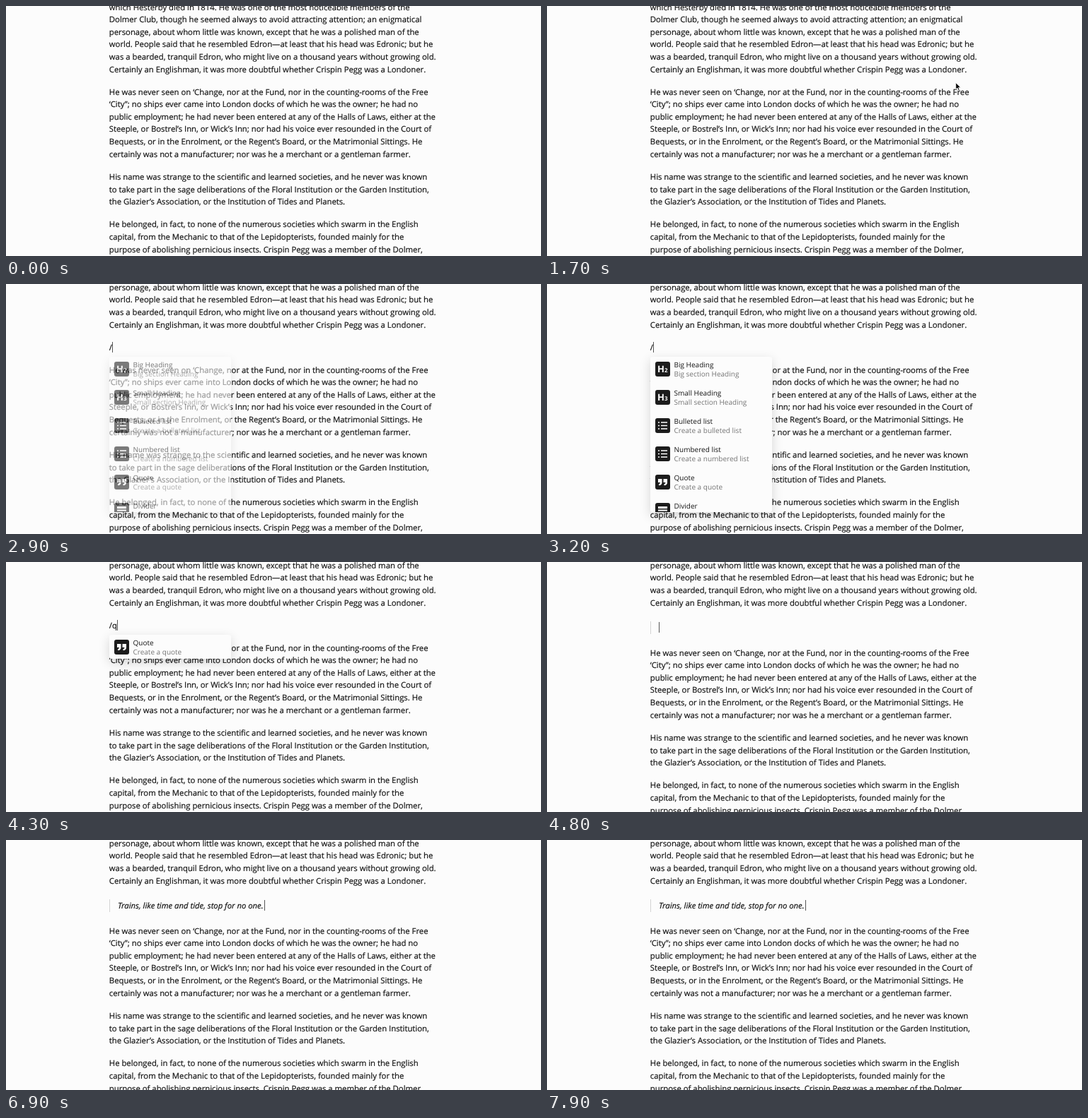
Write an HTML page that moves like this. It is 756 by 354 pixels and loops after 8 s.

```html
<!DOCTYPE html>
<html lang="en">
<head>
<meta charset="utf-8">
<title>Slash command editor</title>
<style>
  html, body { margin: 0; width: 100%; height: 100%; overflow: hidden; background: #fcfcfc; }
  #stage { position: relative; width: 756px; height: 354px; overflow: hidden;
    font: 11.32px/17.6px "Open Sans", sans-serif; color: #161616; text-rendering: geometricPrecision; }
  #stage div, #stage svg { position: absolute; white-space: pre; }
  .line, #quote { -webkit-text-stroke: .2px; }
  .line { left: 145.8px; }
  #hint { top: 81.6px; color: #b4b4b4; }
  #typed { top: 81.6px; }
  #plus { left: 122px; top: 81px; }
  #bar { left: 146px; top: 84px; width: 1px; height: 18px; background: #d4d4d4; }
  #quote { left: 158px; top: 85px; font-style: italic; }
  #caret { width: 1px; height: 15px; background: #555; }
  #menu { left: 146px; top: 103px; width: 172px; overflow: hidden; border-radius: 3px;
    background: #fcfcfc; box-shadow: 0 5px 16px rgba(0, 0, 0, .16); font-size: 10px; line-height: 13px; }
  .item { left: 0; width: 172px; height: 40px; }
  .item svg { left: 7px; top: 7px; }
  .item div { left: 33.5px; }
  .name { top: 5px; }
  .note { top: 18px; color: #757575; }
</style>
</head>
<body>
<div id="stage">
  <div id="above"></div>
  <div id="below"></div>
  <div id="hint" class="line">Type '/' for commands</div>
  <div id="typed" class="line"></div>
  <svg id="plus" width="18" height="18" fill="none" stroke="#777">
    <circle cx="9" cy="9" r="7.8"/><path d="M5.5 9h7M9 5.5v7"/>
  </svg>
  <div id="bar"></div>
  <div id="quote">Trains, like time and tide, stop for no one.</div>
  <div id="menu"></div>
  <div id="caret"></div>
  <svg id="mouse" width="10" height="14">
    <path d="M.7.7v9.3l2.2-2 1.5 3.4 1.6-.7-1.5-3.3h3z" fill="#000" stroke="#fff" stroke-width=".7"/>
  </svg>
</div>
<script>
const LOOP = 8000, STEP = 100, LEAD = 17.6, GAP = 32.3;
const $ = id => document.getElementById(id);

const intro = [
  "which Hesterby died in 1814. He was one of the most noticeable members of the",
  "Dolmer Club, though he seemed always to avoid attracting attention; an enigmatical",
  "personage, about whom little was known, except that he was a polished man of the",
  "world. People said that he resembled Edron—at least that his head was Edronic; but he",
  "was a bearded, tranquil Edron, who might live on a thousand years without growing old.",
  "Certainly an Englishman, it was more doubtful whether Crispin Pegg was a Londoner."
];
const rest = [[
  "He was never seen on ‘Change, nor at the Fund, nor in the counting-rooms of the Free",
  "‘City”; no ships ever came into London docks of which he was the owner; he had no",
  "public employment; he had never been entered at any of the Halls of Laws, either at the",
  "Steeple, or Bostrel’s Inn, or Wick’s Inn; nor had his voice ever resounded in the Court of",
  "Bequests, or in the Enrolment, or the Regent’s Board, or the Matrimonial Sittings. He",
  "certainly was not a manufacturer; nor was he a merchant or a gentleman farmer."
], [
  "His name was strange to the scientific and learned societies, and he never was known",
  "to take part in the sage deliberations of the Floral Institution or the Garden Institution,",
  "the Glazier’s Association, or the Institution of Tides and Planets."
], [
  "He belonged, in fact, to none of the numerous societies which swarm in the English",
  "capital, from the Mechanic to that of the Lepidopterists, founded mainly for the",
  "purpose of abolishing pernicious insects. Crispin Pegg was a member of the Dolmer,"
]];

function addLines(box, lines, top) {
  lines.forEach((text, i) => {
    const el = document.createElement("div");
    el.className = "line";
    el.textContent = text;
    el.style.top = top + i * LEAD + "px";
    box.append(el);
  });
  return top + (lines.length - 1) * LEAD + GAP;
}
addLines($("above"), intro, -6.45);
rest.reduce((top, lines) => addLines($("below"), lines, top), 113.65);

const heading = n => `<text x="3" y="15" font-size="13" font-weight="700">H</text>
  <text x="13" y="15" font-size="8" font-weight="700">${n}</text>`;
const list = [6, 10.5, 15].map(y => `<path d="M4 ${y}h2M8 ${y}h9" stroke="#fff" stroke-width="1.7"/>`).join("");
const mark = x => `<path d="M${x} 6h5.5v5q0 4-4.5 4.3v-2q2-.4 2-2.3h-3z"/>`;
const items = [
  ["Big Heading", "Big section Heading", heading(2)],
  ["Small Heading", "Small section Heading", heading(3)],
  ["Bulleted list", "Create a bulleted list", list],
  ["Numbered list", "Create a numbered list", list],
  ["Quote", "Create a quote", mark(4) + mark(11.5)],
  ["Divider", "Insert a divider", '<path d="M4 5h13v3H4zM4 9.5h13v2H4zM4 13h13v3H4z"/>']
];
$("menu").innerHTML = items.map(([name, note, icon]) => `<div class="item">
  <svg width="21" height="21" fill="#fff"><rect width="21" height="21" rx="3" fill="#1c1c1c"/>${icon}</svg>
  <div class="name">${name}</div><div class="note">${note}</div></div>`).join("");
const rows = [...document.querySelectorAll(".item")];

// start, end, x, y
const carets = [
  [1200, 1700, 592, 82], [1800, 2300, 146, 82], [2800, 3300, 150, 82],
  [3300, 3800, 157, 82], [4300, 4800, 157, 82], [4800, 5300, 158, 85],
  [5800, 5900, 158, 85], [5900, 6400, 365, 85], [6900, 7400, 365, 85], [7900, 8000, 365, 85]
];

const show = (id, on) => { $(id).style.visibility = on ? "visible" : "hidden"; };
const move = (id, x, y) => { $(id).style.transform = `translate(${x}px, ${y}px)`; };
const bezier = (a, b, c, d, s) => {
  const r = 1 - s;
  return r * r * r * a + 3 * r * r * s * b + 3 * r * s * s * c + s * s * s * d;
};

function draw(t) {
  const within = (a, b) => t >= a && t < b;
  const entered = t >= 1800, quoted = t >= 4800, filtered = t >= 3300;

  move("above", 0, entered ? -GAP : 0);
  move("below", 0, quoted ? 7.3 : 0);

  show("mouse", within(100, 1800));
  const p = Math.min(1, Math.max(0, (t - 100) / 600)), s = 1 - (1 - p) ** 2;
  move("mouse", bezier(148, 300, 640, 577, s), bezier(322, 60, -50, 108, s));

  show("hint", within(1800, 2800));
  show("plus", within(1800, 2800));
  show("typed", within(2800, 4800));
  $("typed").textContent = filtered ? "/q" : "/";

  show("menu", within(2800, 4800));
  $("menu").style.opacity = 1 - (1 - Math.min(1, Math.max(0, (t - 2800) / 400))) ** 3;
  $("menu").style.height = filtered ? "34px" : "220px";
  rows.forEach((row, i) => {
    row.style.display = filtered && i !== 4 ? "none" : "block";
    row.style.top = filtered ? 0 : i * 40 + "px";
  });

  show("bar", quoted);
  show("quote", t >= 5900);

  const caret = carets.find(([a, b]) => within(a, b));
  show("caret", caret);
  if (caret) move("caret", caret[2], caret[3]);
}

function tick() {
  draw(Math.floor(performance.now() % LOOP / STEP) * STEP);
  requestAnimationFrame(tick);
}
tick();
</script>
</body>
</html>
```
